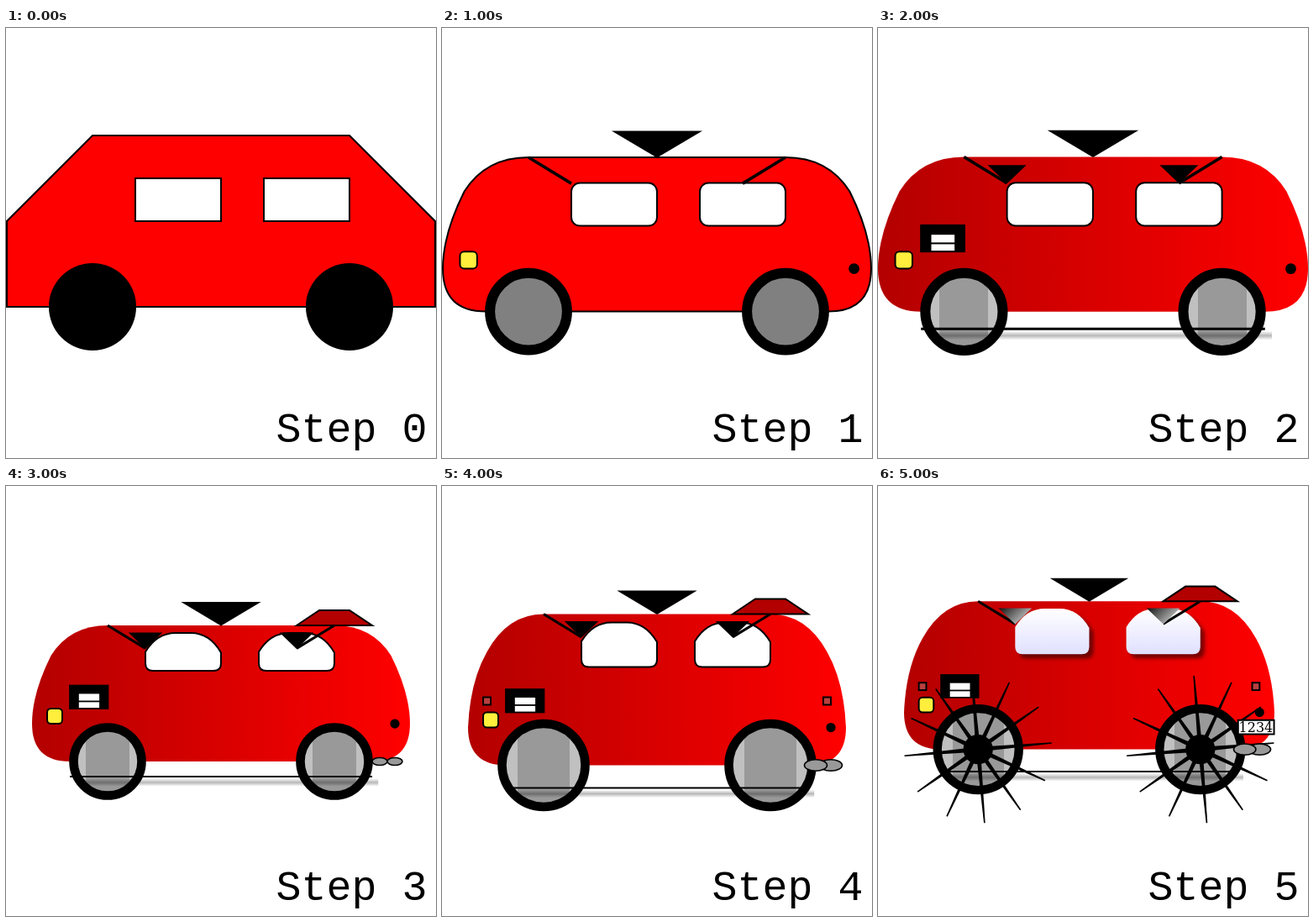
An HTML page for the animation above (6 s loop, 512 px wide and 512 px high).

```html
<!DOCTYPE html>
<html lang="en">
<head>
<meta charset="utf-8">
<title>Car in six steps</title>
<style>
html, body { margin: 0; width: 100%; height: 100%; overflow: hidden; background: #fff; }
svg { display: block; width: 100vw; height: 100vh; }
.step { visibility: hidden; animation: show 6s step-end infinite; }
.label { font: 50px "Liberation Mono", monospace; }
.plate { font: 16px "DejaVu Serif", serif; text-anchor: middle; }
.glass { filter: drop-shadow(5px 5px 2px rgba(0, 0, 0, .5)); }
@keyframes show {
  0% { visibility: visible; }
  16.66667%, 100% { visibility: hidden; }
}
</style>
</head>
<body>
<svg id="stage" viewBox="0 0 512 512">
  <defs>
    <linearGradient id="paint"><stop stop-color="#b30000"/><stop offset="1" stop-color="#f00"/></linearGradient>
    <linearGradient id="metal">
      <stop offset=".185" stop-color="#c0c0c0"/><stop offset=".185" stop-color="#999"/>
      <stop offset=".815" stop-color="#999"/><stop offset=".815" stop-color="#c0c0c0"/>
    </linearGradient>
    <linearGradient id="shade" x2="0" y2="1">
      <stop stop-opacity="0"/><stop offset=".5" stop-opacity=".28"/><stop offset="1" stop-opacity="0"/>
    </linearGradient>
    <linearGradient id="sky" x2="0" y2="1"><stop stop-color="#fff"/><stop offset="1" stop-color="#e0e0ff"/></linearGradient>
    <linearGradient id="fade" y2=".5">
      <stop stop-color="#111"/><stop offset=".55" stop-color="#777"/><stop offset="1" stop-color="#ccc"/>
    </linearGradient>
  </defs>
</svg>
<script>
// Each car is drawn on a grid 100 units wide: origin (x, y), unit u, floor height h.
const cars = [
  { x: 1, y: 128, u: 5.1, h: 40 },
  { x: 1, y: 154, u: 5.1, h: 36 },
  { x: 0, y: 153.5, u: 5.12, h: 36 },
  { x: 31, y: 166, u: 4.5, h: 36 },
  { x: 31, y: 152.5, u: 4.5, h: 40 },
  { x: 31, y: 137.2, u: 4.41, h: 40 }
];

function drawCar({ x, y, u, h }, step) {
  const X = n => x + n * u, Y = n => y + n * u;
  const ink = (w = 2) => `stroke="#000" stroke-width="${w}"`;
  const path = (d, attrs = "") => {
    const scaled = d.replace(/(-?[\d.]+),(-?[\d.]+)/g, (_, a, b) => `${X(+a).toFixed(2)} ${Y(+b).toFixed(2)} `);
    return `<path d="${scaled}" ${attrs}/>`;
  };
  const rect = (a, b, w, hgt, attrs = "", r = 0) =>
    `<rect x="${X(a)}" y="${Y(b)}" width="${w * u}" height="${hgt * u}" rx="${r * u}" ${attrs}/>`;
  const oval = (a, b, rx, ry, attrs = "") =>
    `<ellipse cx="${X(a)}" cy="${Y(b)}" rx="${rx * u}" ry="${ry * u}" ${attrs}/>`;
  const each = (list, draw) => list.map(draw).join("");

  if (step === 0) {
    return path("M0,40L0,20L20,0L80,0L100,20L100,40Z", `fill="red" ${ink()}`)
      + each([30, 60], a => rect(a, 10, 20, 10, `fill="#fff" ${ink()}`))
      + each([20, 80], a => oval(a, 40, 10.2, 10.2));
  }

  const tall = h === 40;
  const low = h - 36;

  const body = () => {
    const side = tall
      ? ["0.5,18", "5,10", "10.5,0", "99.5,18", "95,10", "89.5,0"]
      : ["0,18", "5,8", "10,0", "100,18", "95,8", "90,0"];
    const [a, b, c, d, e, f] = side;
    return path(`M10,${h}Q0,${h} 0,${h - 10}Q${a} ${b}Q${c} 20,0L80,0Q${f} ${e}Q${d} 100,${h - 10}Q100,${h} 90,${h}Z`,
      step === 1 ? `fill="red" ${ink()}` : 'fill="url(#paint)"');
  };

  const pane = a => {
    const look = step === 5 ? 'fill="url(#sky)" class="glass"' : `fill="#fff" ${ink()}`;
    if (step < 3) return rect(a, 6, 20, 10, look, 2);
    const t = step === 4 ? 2.2 : 2, b = [12, 14, 14.3][step - 3], r = a + 20;
    return path(`M${a},${b - 2}L${a},${t + 5}Q${a + 3},${t} ${a + 8},${t}L${a + 12},${t}`
      + `Q${a + 17},${t} ${r},${t + 5.2}L${r},${b - 2}Q${r},${b} ${r - 2},${b}L${a + 2},${b}Q${a},${b} ${a},${b - 2}Z`, look);
  };

  const wheel = a => {
    const r = tall ? 11 : 9;
    const fill = step === 1 ? "#808080" : "url(#metal)";
    return oval(a, h, r, r, `fill="${fill}" ${ink(2.35 * u)}`);
  };

  const spikes = a => {
    let out = oval(a, h, 4, 4);
    for (let k = 0; k < 12; k++) {
      out += `<path d="M0-2.8L88-.8V.8L0 2.8Z" transform="translate(${X(a)} ${Y(h)}) rotate(${k * 30 - 5})"/>`;
    }
    return out;
  };

  const grille = () => rect(9.8, 15.7 + low, 10.5, 6.5)
    + rect(12.4, 18.1 + low, 5.4, 1.8, 'fill="#fff"')
    + rect(12.4, 20.3 + low, 5.4, 1.5, 'fill="#fff"');

  const axle = () => {
    const b = h + (tall ? 6 : 4);
    return rect(11.7, b + .5, 79.9, 2.1, 'fill="url(#shade)"')
      + path(`M10,${b}L90,${b}`, ink(step === 2 ? 3 : 2));
  };

  const exhaust = () => {
    const k = tall ? 1.5 : 1;
    return each([96, 92], a => oval(a, h, 2 * k, k, `fill="#999" ${ink(1.6)}`));
  };

  let out = body() + each([30, 60], pane)
    + path("M39.4,-6.2L60.6,-6.2L50,0.1Z")
    + path("M20,0L30,6.1M80,0L70,6.1", `fill="none" ${ink(.7 * u)}`);
  if (step > 1) {
    out += each([30, 70], a => path(`M${a - 4.5},1.9L${a + 4.5},1.9L${a},6.2Z`, step === 5 ? 'fill="url(#fade)"' : ""))
      + grille();
  }
  out += rect(4, 22 + low, 4, 4, `fill="#ffee3c" ${ink()}`, 1)
    + oval(96, h - 10, 1.25, 1.25);
  if (step > 2) out += path("M70,0L76,-4L84,-4L90,0Z", `fill="#b30000" ${ink()}`);
  if (tall) out += each([4, 94], a => rect(a, 22, 2, 2, `fill="#b84040" ${ink()}`));
  out += each([20, 80], wheel);
  if (step > 1) out += axle();
  if (step === 5) out += each([20, 80], spikes);
  if (step > 2) out += exhaust();
  if (step === 5) {
    out += rect(90.2, 32.1, 9.7, 3.8, `fill="#fff" ${ink()}`)
      + `<text class="plate" x="${X(95)}" y="293">1234</text>`;
  }
  return out;
}

document.getElementById("stage").insertAdjacentHTML("beforeend", cars.map((car, i) =>
  `<g class="step" style="animation-delay:${i - 6}s">${drawCar(car, i)}
   <text class="label" x="321.5" y="492.5">Step ${i}</text></g>`).join(""));
</script>
</body>
</html>
```
